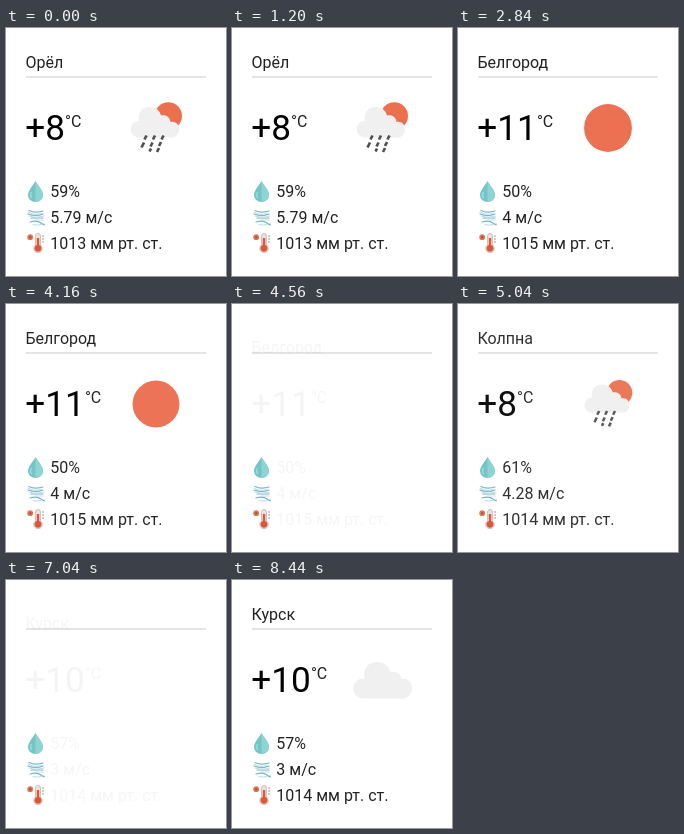
An HTML page for the animation above (8.6 s loop, 220 px wide and 248 px high).

```html
<!DOCTYPE html>
<html lang="ru">
<head>
<meta charset="utf-8">
<style>
  html, body { margin: 0; width: 100%; height: 100%; overflow: hidden; background: #fff; }
  svg { display: block; width: 220px; height: 248px; }
  text { font: 16px Roboto, Arial, sans-serif; fill: #212121; }
  #degrees { font-size: 35.2px; fill: #000; }
</style>
</head>
<body>
<svg viewBox="0 0 220 248">
  <defs>
    <clipPath id="header"><path d="M0 0H220V49H0Z"/></clipPath>
    <g id="sunny"><circle cx="150" cy="100" r="23.9" fill="#ec7152"/></g>
    <g id="cloudy">
      <path fill="#f0f0f0" d="M131 118.5A10 10 0 0 1 131 98.5L133 98.5C130 88 137 82 145 82C152 82 157 86 158.5 92C164 90.5 169 94 169.5 99C176 98 180 103 180 108.5C180 114 176 118.5 170 118.5Z"/>
    </g>
    <g id="rainy">
      <circle cx="162.3" cy="88" r="13.7" fill="#ea704e"/>
      <path fill="#f0f0f0" d="M132 109.5A8.3 8.3 0 0 1 132 93L133 93C131 84 137 79 143.5 79C149.5 79 153.5 82 155 87.5C160 86.5 164 89 164.5 94C170 93 173 97 173 101.5C173 106 169.5 109.5 165 109.5Z"/>
      <path fill="none" stroke="#505050" stroke-width="2.7" d="M140.5 107.5l-2 4M149 107.5l-2 4M157.5 107.5l-2 4M138 114.5l-2.5 5M146.5 114.5l-2 4M155 114l-2 4M145 120.5l-1.5 3M153 120l-2 4"/>
    </g>
  </defs>

  <path d="M20 49H200" stroke="#e4e4e4" stroke-width="2"/>

  <path d="M29.5 153C27 158 22 162 22 167A7.5 7 0 0 0 37 167C37 162 32 158 29.5 153Z" fill="#74c4c8"/>
  <path d="M29.5 153C32 158 37 162 37 167A7.5 7 0 0 1 29.5 174Z" fill="#8fd3d3"/>
  <path d="M25.5 164q-2 4 .5 6" fill="none" stroke="#9bdcdc" stroke-width="1.5"/>

  <g fill="none" stroke-linecap="round" stroke-width="1.2">
    <path stroke="#79b3c6" d="M23 182.5q6 3 14 .5M22 186q8 3 15 0M25 190h12M24 194q7-2 11 1t3 1"/>
    <path stroke="#bfe0e6" d="M22 184q7 4 13 1M23 188q7 2 15 0M29 192h8M27 196.5q4 1 8 0"/>
  </g>

  <circle cx="24.2" cy="209.2" r="2.9" fill="#e57550"/>
  <circle cx="24.2" cy="209.2" r="1.2" fill="#b75338"/>
  <path d="M29.5 208a2.5 2.5 0 0 1 5 0v9a4.3 4.3 0 1 1-5 0Z" fill="#eee2de" stroke="#c9a9a0" stroke-width=".7"/>
  <path d="M32 210v10" stroke="#d9583c" stroke-width="2.4"/>
  <circle cx="32" cy="220.3" r="3.4" fill="#d9583c"/>
  <path d="M36 208h2M36 211h2M36 214h2" stroke="#9a9a9a"/>

  <g id="report">
    <g clip-path="url(#header)"><text id="city" x="19.5" y="39.7"></text></g>
    <text id="degrees" x="19.2" y="112.3"></text>
    <text id="unit" y="99">°C</text>
    <use id="weather"/>
    <text id="humidity" x="44.3" y="169"></text>
    <text id="wind" x="44.3" y="195"></text>
    <text id="pressure" x="44.3" y="221"></text>
  </g>
</svg>
<script>
  const LOOP = 8600, FADE = 500;
  // start: the moment the previous city begins to leave
  const reports = [
    { start: -1000, city: 'Орёл', degrees: '+8', humidity: '59%', wind: '5.79 м/с', pressure: 1013, weather: 'rainy' },
    { start: 1520, city: 'Белгород', degrees: '+11', humidity: '50%', wind: '4 м/с', pressure: 1015, weather: 'sunny' },
    { start: 4120, city: 'Колпна', degrees: '+8', humidity: '61%', wind: '4.28 м/с', pressure: 1014, weather: 'rainy' },
    { start: 6480, city: 'Курск', degrees: '+10', humidity: '57%', wind: '3 м/с', pressure: 1014, weather: 'cloudy' }
  ];
  const byId = id => document.getElementById(id);
  const clamp = value => Math.max(0, Math.min(1, value));
  const ease = x => x * x * (3 - 2 * x);
  let shown;

  function show(report) {
    if (report === shown) return;
    shown = report;
    for (const id of ['city', 'degrees', 'humidity', 'wind']) byId(id).textContent = report[id];
    byId('pressure').textContent = report.pressure + ' мм рт. ст.';
    byId('unit').setAttribute('x', 19.2 + report.degrees.length * 19.9);
    byId('weather').setAttribute('href', '#' + report.weather);
  }

  function draw(now) {
    const time = now % LOOP;
    const index = reports.findLastIndex(report => time >= report.start + FADE);
    const report = reports[index], next = reports[index + 1];
    const entering = clamp((time - report.start - FADE) / FADE);
    const leaving = next ? clamp((time - next.start) / FADE) : 0;
    const presence = ease(Math.min(entering, 1 - leaving));

    show(report);
    byId('report').setAttribute('opacity', presence);
    byId('city').setAttribute('transform', `translate(0 ${10 * (1 - presence)})`);
    byId('weather').setAttribute('transform', `translate(150 100) scale(${presence}) translate(-150 -100)`);
  }

  const begin = performance.now();
  function tick() {
    draw(performance.now() - begin);
    requestAnimationFrame(tick);
  }
  tick();
</script>
</body>
</html>
```
